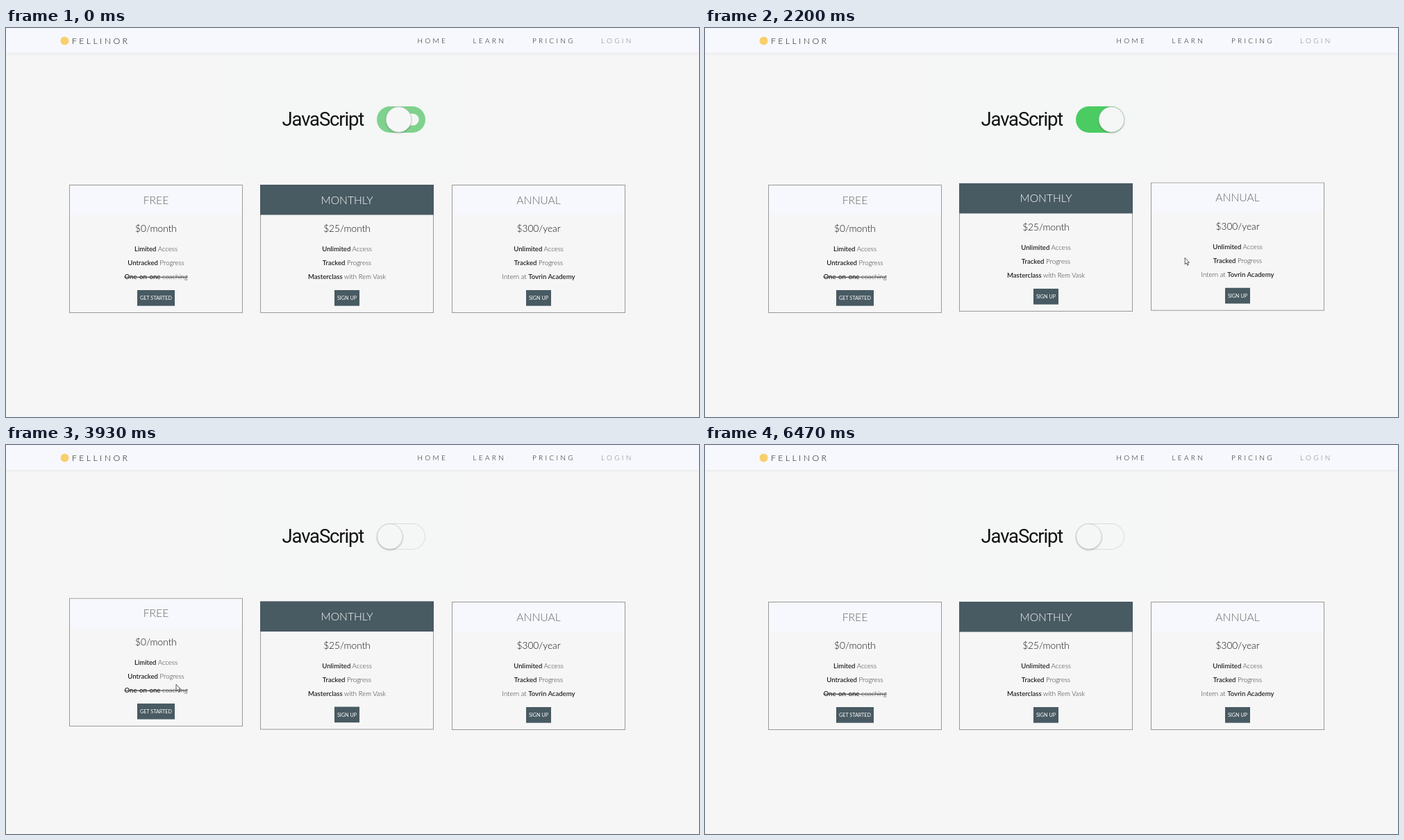
Recreate the animation shown at these times as an HTML page. Size 998 by 561 pixels, loop 6870 ms.

```html
<!DOCTYPE html>
<html lang="en">
<head>
<meta charset="utf-8">
<title>Pricing cards</title>
<style>
  html, body { margin: 0; height: 100%; overflow: hidden; background: #f6f6f6; }
  svg { display: block; width: 998px; height: 561px; font-family: Lato, sans-serif; font-weight: 300; fill: #111; }
  .bar { fill: #f7f8fd; filter: drop-shadow(0 1px 2px #0001); }
  .brand { font-size: 12.3px; letter-spacing: 3.4px; }
  .nav { font-size: 10px; letter-spacing: 3.3px; }
  .label { font: 27.5px Roboto, sans-serif; letter-spacing: -1.15px; }
  .card { text-anchor: middle; }
  .frame { fill: #f6f6f6; stroke: #999; }
  .title { font-size: 15.7px; }
  .price { font-size: 13.7px; }
  .row { font-size: 9.6px; fill: #333; }
  .row tspan { font-weight: 500; fill: #111; }
  .button { font-size: 7.2px; font-weight: 400; fill: #fff; }
  .knob { fill: #f5f7f6; stroke: #ccd0ce; stroke-width: .7; filter: drop-shadow(0 1px 1px #0004); }
</style>
</head>
<body>
<svg viewBox="0 0 998 561">
  <rect x="320" y="37" width="345" height="174" fill="#f4f7f5"/>
  <rect class="bar" width="998" height="36"/>
  <circle cx="84.5" cy="18.5" r="6" fill="#f9cf6c"/>
  <text class="brand" x="95" y="23.3">FELLINOR</text>
  <g class="nav">
    <text x="592.5" y="22">HOME</text>
    <text x="672.5" y="22">LEARN</text>
    <text x="758" y="22">PRICING</text>
    <text x="857" y="22" fill="#777">LOGIN</text>
  </g>
  <text class="label" x="397.5" y="141">JavaScript</text>
  <rect id="track" x="534" y="113" width="70" height="38" rx="19"/>
  <rect id="inset" x="535" y="114" width="68" height="36" rx="18" fill="#f4f7f5"/>
  <circle id="knob" class="knob" cy="132" r="18.2"/>
  <g id="cards"></g>
  <path id="arrow" d="M0 0V9.5L2.1 7.6 3.7 11 5.1 10.3 3.6 7H6.3Z" fill="#fff" stroke="#333" stroke-width=".8"/>
  <path id="beam" d="M-2-4.5Q0-4.5 0-3.5Q0-4.5 2-4.5M0-3.5V3.5M-2 4.5Q0 4.5 0 3.5Q0 4.5 2 4.5" fill="none" stroke="#222"/>
</svg>
<script>
const LOOP = 6870, STEP = 200 / 3, LIFT = 6.5;
const $ = id => document.getElementById(id);
const clamp = v => Math.max(0, Math.min(1, v));
const mix = (a, b, p) => a + (b - a) * p;
const easeOut = u => 1 - (1 - clamp(u)) ** 3;
const easeInOut = u => { u = clamp(u); return u * u * (3 - 2 * u); };

// Each card: hover holds alternating enter and leave times in ms.
const plans = [
  { name: 'FREE', price: '$0/month', button: 'GET STARTED', width: 54, hover: [250, 1130, 3650, 5150],
    rows: ['*Limited* Access', '*Untracked* Progress', '*One-on-one* coaching'], strike: true },
  { name: 'MONTHLY', price: '$25/month', button: 'SIGN UP', width: 36, hover: [1180, 1950, 3090, 3600],
    rows: ['*Unlimited* Access', '*Tracked* Progress', '*Masterclass* with Rem Vask'], dark: true },
  { name: 'ANNUAL', price: '$300/year', button: 'SIGN UP', width: 36, hover: [2000, 3070],
    rows: ['*Unlimited* Access', '*Tracked* Progress', 'Intern at *Tovrin Academy*'] }
];
const toggles = [-100, 1545, 3035, 4560, 6100];
// Pointer path: time, x, y
const path = [
  [0, -12, 335], [70, 22, 333], [350, 150, 322], [930, 244, 314], [1130, 340, 317], [1180, 366, 318],
  [1600, 433, 321], [1950, 616, 328], [2000, 642, 329], [2350, 728, 333], [2800, 713, 334],
  [3070, 642, 337], [3090, 616, 338], [3400, 455, 341], [3600, 366, 343], [3670, 332, 344],
  [4100, 190, 346], [4530, 167, 346], [4900, 150, 346], [5150, 91, 345], [5200, 58, 345],
  [5470, 4, 344], [5600, -12, 344], [LOOP, -12, 344]
];

function cardMarkup(plan, i) {
  const row = (text, k) => {
    const line = plan.strike && k === 2 ? ' text-decoration="line-through"' : '';
    return `<text class="row" y="${322.3 + k * 20}"${line}>${text.replace(/\*(.+?)\*/, '<tspan>$1</tspan>')}</text>`;
  };
  const [head, ink, edge] = plan.dark ? ['#485a62', '#fff', 0] : ['#f7f8fd', '#666', 1];
  return `<g class="card" transform="translate(${216 + Math.floor(275.5 * i)})"><g>
    <rect class="frame" x="-124.5" y="226.5" width="249" height="184"/>
    <rect x="${edge - 125}" y="${226 + edge}" width="${250 - 2 * edge}" height="${43.5 - edge}" fill="${head}"/>
    <text class="title" y="253.5" fill="${ink}">${plan.name}</text>
    <text class="price" y="294">${plan.price}</text>
    ${plan.rows.map(row).join('')}
    <rect x="${-plan.width / 2}" y="378" width="${plan.width}" height="22.7" fill="#485a62"/>
    <text class="button" y="392">${plan.button}</text></g></g>`;
}
$('cards').innerHTML = plans.map(cardMarkup).join('');
const bodies = [...document.querySelectorAll('.card > g')];

// Sum of eased switches that alternate in direction.
const alternate = (times, t, duration, ease, sign) =>
  times.reduce((sum, start, i) => sum + (i % 2 ? -sign : sign) * ease((t - start) / duration), 0);

function pointer(t) {
  const i = Math.max(1, path.findIndex(key => key[0] >= t));
  const [t0, x0, y0] = path[i - 1], [t1, x1, y1] = path[i];
  const p = (t - t0) / (t1 - t0);
  return `translate(${mix(x0, x1, p)} ${mix(y0, y1, p)})`;
}

function draw(now) {
  const t = Math.floor((now % LOOP + 5) / STEP) * STEP;

  const on = 1 + alternate(toggles, t, 370, easeOut, -1);
  const tint = clamp(on * 1.65);
  $('track').setAttribute('fill', `rgb(${mix(220, 75, tint)} ${mix(222, 204, tint)} ${mix(221, 98, tint)})`);
  $('inset').setAttribute('transform', `translate(587 132) scale(${clamp(1 - on * 1.35)}) translate(-587 -132)`);
  $('knob').setAttribute('cx', mix(552.8, 585.5, on));

  plans.forEach((plan, i) => {
    const lift = alternate(plan.hover, t, 400, easeInOut, 1);
    bodies[i].setAttribute('transform', `translate(0 ${-LIFT * lift})`);
  });

  const overText = t > 820 && t < 1060;
  $('beam').setAttribute('visibility', overText ? 'visible' : 'hidden');
  $('arrow').setAttribute('visibility', overText ? 'hidden' : 'visible');
  for (const id of ['beam', 'arrow']) $(id).setAttribute('transform', pointer(t));
}

let start;
function tick(now) {
  start ??= now;
  draw(now - start);
  requestAnimationFrame(tick);
}
draw(0);
requestAnimationFrame(tick);
</script>
</body>
</html>
```
